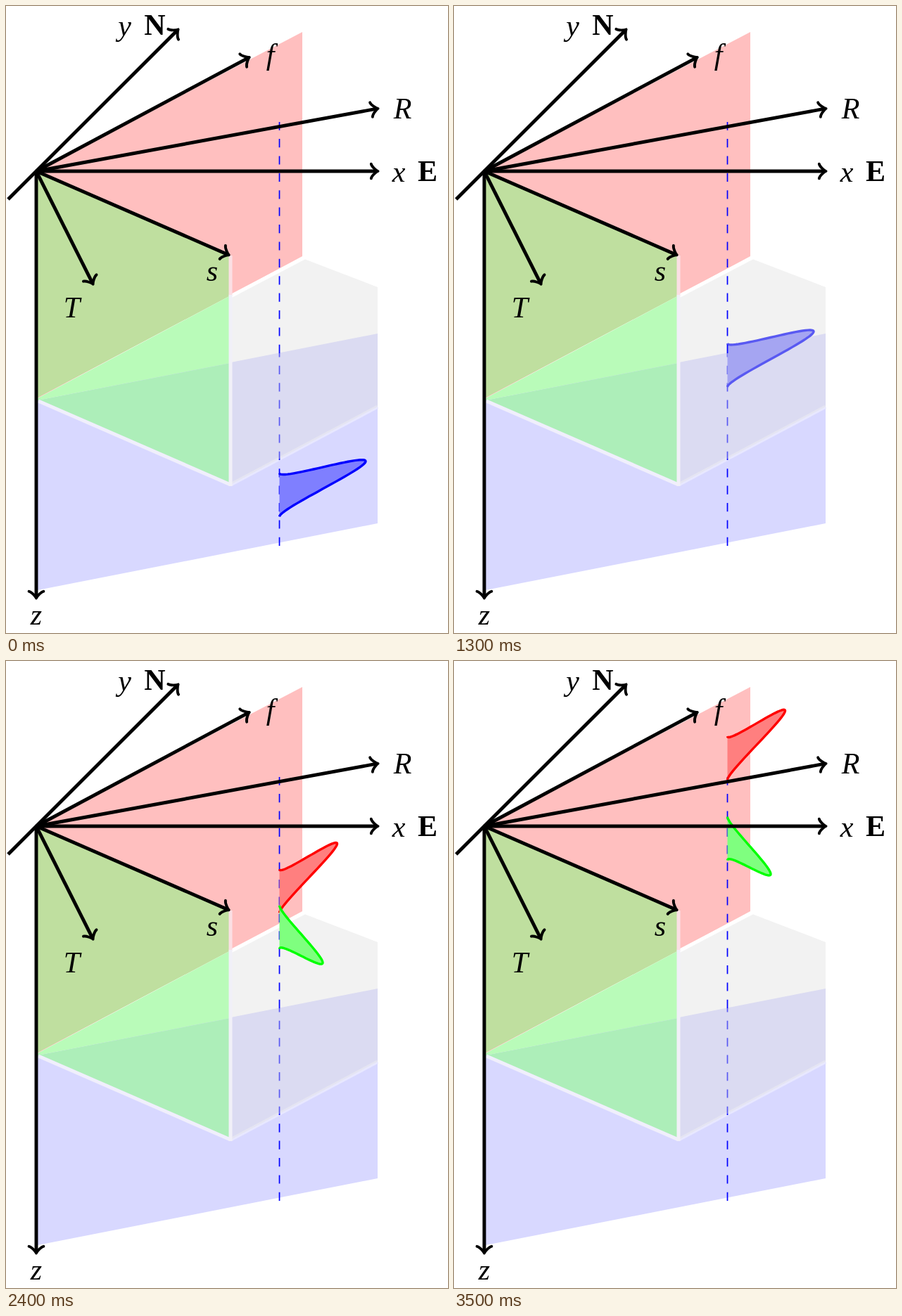
An HTML page for the animation above (3.6 s loop, 628 by 892 pixels).

```html
<!DOCTYPE html>
<html>
<head>
<meta charset="utf-8">
<style>
html, body { margin: 0; height: 100%; overflow: hidden; background: #fff; }
svg { display: block; width: 628px; height: 892px; }
path { fill: none; }
text { font: italic 42px "Liberation Serif", serif; text-anchor: middle; }
.bold { font-style: normal; font-weight: bold; }
.edge { stroke-width: 5; }
.dash { stroke: #00f; stroke-width: 1.7; stroke-dasharray: 12.2; }
.pulse { stroke-width: 3.4; }
#axes { stroke: #000; stroke-width: 4.9; }
#axes .tip { stroke-width: 3.9; stroke-linecap: round; stroke-linejoin: round; }
</style>
</head>
<body>
<svg viewBox="0 0 628 892">
  <polygon fill="#ffbfbf" points="43,235 421,37 421,356 43,559"/>
  <polygon fill="#d8d8ff" points="45,561 528,466 528,736 45,831"/>
  <path class="edge" stroke="#e8e8ff" d="M319 681L528 570"/>
  <path class="dash" d="M388.5 768V494"/>
  <path class="pulse" id="blue" fill="#7f7fff" stroke="#00f" style="fill:#7f7fff"/>
  <polygon fill="#dfdfdf" fill-opacity=".4" points="319,414 424,360 528,400 528,570 319,681"/>
  <polygon fill="#bfdf9f" points="45,236 319,355 319,412 45,557"/>
  <polygon fill="#b9fbb9" points="45,558 319,412 319,508 45,561"/>
  <polygon fill="#adeeb9" points="45,561 319,508 319,679"/>
  <path class="edge" stroke="#fff" d="M319 413L424 358"/>
  <path class="edge" stroke="#f0effc" d="M46 562L319 681"/>
  <path class="edge" stroke="#fbdfe4" d="M319 355V412"/>
  <path class="edge" stroke="#f1f0f8" d="M319 411V683"/>
  <path class="dash" d="M388.5 494V165"/>
  <path class="pulse" id="red" stroke="#f00" style="fill:#ff7f7f"/>
  <path class="pulse" id="green" stroke="#0f0" style="fill:#7fff7f"/>
  <g id="axes"></g>
  <text x="168.5" y="42">y</text><text class="bold" x="211.5" y="41">N</text>
  <text x="375.5" y="83">f</text>
  <text x="563.5" y="160">R</text>
  <text x="558" y="250">x</text><text class="bold" x="599" y="249">E</text>
  <text x="293" y="391">s</text>
  <text x="93.5" y="443">T</text>
  <text x="43" y="880">z</text>
</svg>
<script>
const $ = id => document.getElementById(id);

function arrow(x, y, x0 = 43, y0 = 235) {
  const angle = Math.atan2(y - y0, x - x0) * 180 / Math.PI;
  const length = Math.hypot(x - x0, y - y0) - 3.9;
  return `<g transform="translate(${x0} ${y0}) rotate(${angle})">
    <path d="M0 0H${length}"/>
    <path class="tip" transform="translate(${length})"
      d="M-7.8 -10.4C-7.1 -6.5 0 -.6 1.95 0C0 .6 -7.1 6.5 -7.8 10.4"/></g>`;
}

$('axes').innerHTML = arrow(246, 32, 3, 275) + [
  [347.5, 72], [530.5, 145.5], [530.5, 235], [318.5, 355], [124.5, 397.5], [43, 844.5]
].map(([x, y]) => arrow(x, y)).join('');

// A raised-cosine bump, sheared along its direction of motion
function bump(size, shear) {
  let d = 'M';
  for (let i = 0; i <= 60; i++) {
    const x = size * (1 - Math.cos(i / 30 * Math.PI)) / 2;
    d += `${x.toFixed(2)} ${(62 * i / 60 - shear * x).toFixed(2)} `;
  }
  return d;
}

$('blue').setAttribute('d', bump(122.5, .39));
$('red').setAttribute('d', bump(82, .82));
$('green').setAttribute('d', bump(61.5, -.82));

function place(id, y, shown) {
  $(id).setAttribute('transform', `translate(388.5 ${y})`);
  $(id).setAttribute('visibility', shown ? 'visible' : 'hidden');
}

const SPLIT = 15;
function draw(now) {
  const step = Math.floor(now % 3600 / 100);
  const after = step - SPLIT;
  place('blue', 664.5 - 14.2 * step, after < 0);
  place('red', 451 - 17.2 * after, after >= 0);
  place('green', 451 - 11.47 * after, after >= 0);
  requestAnimationFrame(draw);
}
draw(performance.now());
</script>
</body>
</html>
```
